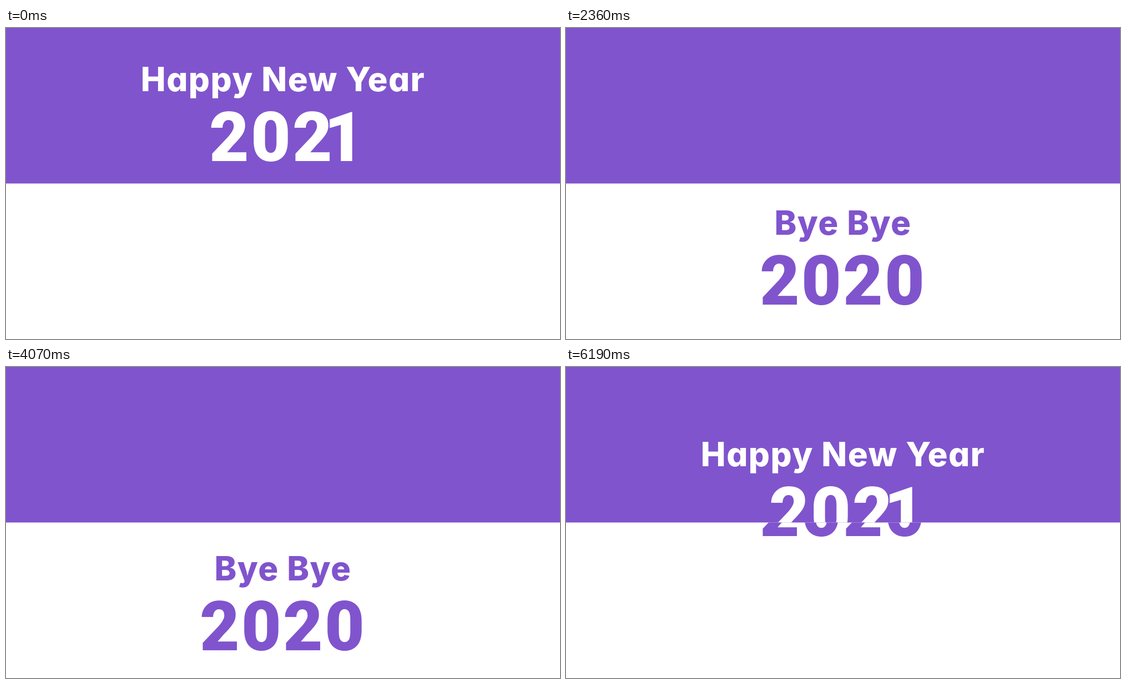
These frames come from a looping animation (998x561 px, 6.22 s). An HTML page:

```html
<!DOCTYPE html>
<html lang="en">
<head>
<meta charset="utf-8">
<title>Happy New Year</title>
<style>
  html, body { margin: 0; width: 100%; height: 100%; overflow: hidden; background: #fff; }
  svg { display: block; }
  .words {
    font: 800 60px Inter, sans-serif;
    font-feature-settings: "cv11";
    letter-spacing: .024em;
    text-anchor: middle;
  }
  .year { font: 900 124px Roboto, sans-serif; letter-spacing: .025em; }
</style>
</head>
<body>
<svg width="998" height="561" viewBox="0 0 998 561">
  <rect width="998" height="561" fill="#fff"/>
  <rect width="998" height="280.5" fill="#8054cd"/>
  <!-- Each nested svg clips its text to one half -->
  <svg width="998" height="280.5" viewBox="0 0 998 280.5" fill="#fff">
    <g class="mover">
      <text class="words" x="499" y="114">Happy New Year</text>
      <text class="year" x="366" y="239.7">202<tspan dx="-18">1</tspan></text>
    </g>
  </svg>
  <svg y="280.5" width="998" height="280.5" viewBox="0 280.5 998 280.5" fill="#8054cd">
    <g class="mover">
      <text class="words" x="499" y="114">Bye Bye</text>
      <text class="year" x="349" y="239.7">2020</text>
    </g>
  </svg>
</svg>
<script>
  const LOOP = 6220;     // the loop cuts in the middle of the third fall
  const CYCLE = 2948, FALL = 1532, RISE = 355;
  const LEAD = 290;      // time already fallen when the loop starts
  const TOP = -21, BOTTOM = 275;
  const movers = document.querySelectorAll(".mover");

  const easeInOut = x => x < .5 ? 2 * x * x : 1 - 2 * (1 - x) ** 2;

  // Share of the way down: fall, rest at the bottom, rise
  function depth(t) {
    const local = (t + LEAD) % CYCLE;
    return easeInOut(Math.min(1, local / FALL, (CYCLE - local) / RISE));
  }

  function draw(t) {
    const y = TOP + (BOTTOM - TOP) * depth(t);
    movers.forEach(m => m.setAttribute("transform", `translate(0 ${y.toFixed(2)})`));
  }

  const start = performance.now();
  function frame() {
    draw((performance.now() - start) % LOOP);
    requestAnimationFrame(frame);
  }
  draw(0);
  requestAnimationFrame(frame);
</script>
</body>
</html>
```
